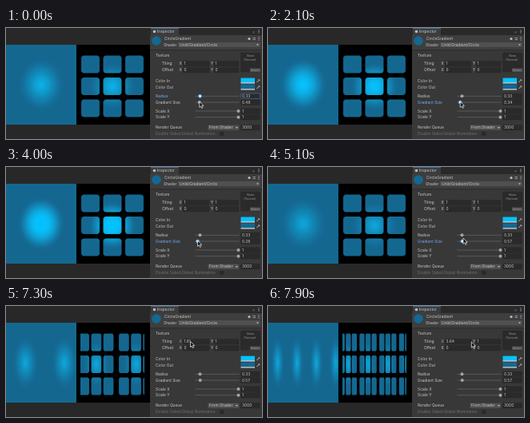
Write an HTML page with a canvas that moves like this. It is 320 px wide and 139 px high and loops after 8000 ms.

```html
<!DOCTYPE html>
<html lang="en">
<head>
<meta charset="utf-8">
<title>Circle gradient inspector</title>
<style>
html, body { margin: 0; width: 100%; height: 100%; overflow: hidden; background: #282828; }
#stage { position: relative; width: 320px; height: 139px; overflow: hidden; }
canvas, svg { position: absolute; left: 0; top: 0; }
text { font: 4.9px Inter, "Liberation Sans", sans-serif; fill: #c8c8c8; }
.small { font-size: 3.6px; fill: #999; }
.dim { fill: #707070; }
.on { fill: #6fb0f5; }
.field { fill: #2a2a2a; stroke: #242424; stroke-width: .4; }
.field.on { fill: #2a2a2a; stroke: #3a79bb; stroke-width: .6; }
.menu { fill: #505050; stroke: #303030; stroke-width: .4; }
.knob { fill: #a5a5a5; }
.knob.on { fill: #e4f2ff; stroke: #3e8fd0; stroke-width: .9; }
</style>
</head>
<body>
<div id="stage">
  <canvas id="view" width="181" height="139"></canvas>
  <svg id="panel" width="320" height="139" viewBox="0 0 320 139"></svg>
</div>
<script>
const LOOP = 8000, STEP = 100;
const IN = [4, 194, 253], OUT = [20, 104, 146];
const RADIUS = 0.33;
const cyan = `rgb(${IN})`, blue = `rgb(${OUT})`;

// [time, value] points, joined by straight lines
const sizeKeys = [[0, .48], [900, .06], [1000, .03], [1100, 0], [1200, 0], [1400, .09], [1500, .09],
  [1800, .26], [2000, .26], [2300, .5], [2400, .5], [3300, 1.04], [4000, .28], [4100, .28], [4800, .57]];
const tileKeys = [[6400, 1], [7000, 1.5], [7300, 1.81], [7900, 3.64]];
const pathX = [[5000, 243], [5300, 246], [5400, 246], [5800, 226], [6100, 226], [6400, 220]];
const pathY = [[0, 92.3], [5000, 92.3], [5300, 83], [5400, 83], [5800, 52], [6100, 52], [6400, 43], [7300, 44.5], [7900, 45]];

function track(keys, t) {
  if (t <= keys[0][0]) return keys[0][1];
  for (let i = 1; i < keys.length; i++) {
    const [a, p] = keys[i - 1], [b, q] = keys[i];
    if (t <= b) return p + (q - p) * (t - a) / (b - a);
  }
  return keys[keys.length - 1][1];
}
const clamp = v => Math.min(1, Math.max(0, v));
const knobX = size => 236.5 + size * 11;
const num = v => String(+v.toFixed(2));

// Inspector panel
const text = (x, y, s, cls = '', id = '') => `<text x="${x}" y="${y + 1.75}" class="${cls}" id="${id}">${s}</text>`;
const box = (x, y, w, h, cls, id = '') => `<rect x="${x}" y="${y}" width="${w}" height="${h}" rx="1" class="${cls}" id="${id}"/>`;
const fill = (x, y, w, h, c) => `<rect x="${x}" y="${y}" width="${w}" height="${h}" fill="${c}"/>`;
const arrow = (x, y) => `<path d="M${x} ${y}h3l-1.5 2z" fill="#bbb"/>`;
const dots = (x, y) => [0, 1.7, 3.4].map(d => `<circle cx="${x}" cy="${y + d}" r=".55" fill="#bbb"/>`).join('');

function slider(y, label, value, x, id) {
  return text(187, y, label, '', id + 'Label') + fill(236.5, y - .4, 55, .8, '#606060') +
    `<circle cx="${x}" cy="${y}" r="2" class="knob" id="${id}Knob"/>` +
    box(293.5, y - 3.3, 24, 6.6, 'field', id + 'Field') + text(295, y, value, '', id + 'Value');
}
function vector(y, label, v, id) {
  return text(195, y, label) +
    text(216.5, y, 'X', '', id + 'X') + box(221, y - 3.3, 33, 6.6, 'field') + text(222.5, y, v, '', id + 'Value') +
    text(256, y, 'Y') + box(260, y - 3.3, 31, 6.6, 'field') + text(261.5, y, v);
}
function swatch(y, label, color) {
  return text(187, y, label) + fill(293.5, y - 3.4, 17.5, 5.8, color) + fill(293.5, y + 2.4, 17.5, 1, '#fff') +
    `<path d="M313.5 ${y + 2}l3-3M315.5 ${y - 2}l2 2" stroke="#bbb" stroke-width="1" fill="none"/>`;
}

document.getElementById('panel').innerHTML =
  fill(180, 0, 140, 139, '#383838') + fill(180, 0, 140, 9, '#292929') + fill(181, 0, 35, 9, '#3c3c3c') +
  fill(181, 0, 35, .8, '#3a79bb') + fill(180, 9, 140, 18.5, '#3e3e3e') + fill(180, 27.5, 140, .6, '#222') +
  '<circle cx="185.5" cy="4.5" r="1.8" fill="#bbb"/>' + text(189, 4.5, 'Inspector') +
  dots(316, 2.7) + box(308, 4, 3, 2.5, 'menu') +
  `<circle cx="188" cy="16" r="5.8" fill="${blue}"/>` +
  text(198, 13.7, 'CircleGradient') +
  '<circle cx="304" cy="13.5" r="1.6" fill="#bbb"/>' +
  '<path d="M308.5 12.5h3.5M308.5 14.5h3.5" stroke="#bbb" stroke-width=".7"/>' + dots(316, 11.9) +
  text(197, 21, 'Shader') + box(214.5, 17.5, 103.5, 7, 'menu') + text(217, 21, 'Unlit/Gradient/Circle') + arrow(313, 20.2) +
  text(187, 34.5, 'Texture') + box(293.5, 31, 24.5, 24, 'field') +
  text(301, 34.5, 'None', 'small') + text(297, 39, '(Texture)', 'small') +
  fill(305, 50.5, 13, 4.5, '#505050') + text(306, 52.3, 'Select', 'small') +
  vector(44.7, 'Tiling', 1, 'tile') + vector(52.7, 'Offset', 0, 'offset') +
  swatch(66, 'Color In', cyan) + swatch(74, 'Color Out', blue) +
  slider(85.3, 'Radius', num(RADIUS), 242.5, 'radius') + slider(93, 'Gradient Size', '', 0, 'size') +
  slider(104, 'Scale X', 1, 290.5, 'sx') + slider(111.7, 'Scale Y', 1, 290.5, 'sy') +
  text(187, 124.7, 'Render Queue') + box(252, 121.2, 39.5, 7, 'menu') + text(254, 124.7, 'From Shader') + arrow(287, 123.9) +
  box(293.5, 121.4, 24, 6.6, 'field') + text(295, 124.7, '3000') +
  text(187, 132.7, 'Double Sided Global Illumination', 'dim') + box(267.5, 130.3, 4.5, 4.5, 'field') +
  '<path id="mouse" d="M0 0v7l1.7-1.5 1.2 2.6 1.3-.6-1.2-2.5h2.2z" fill="#111" stroke="#f4f4f4" stroke-width=".7"/>';

const el = id => document.getElementById(id);
const mark = (on, ...ids) => ids.forEach(id => el(id).classList.toggle('on', on));

// Shaded quads
const ctx = el('view').getContext('2d');
const left = { x: 0, y: 21, w: 88, h: 100, mask: () => 1 };
const right = { x: 88, y: 28, w: 90, h: 90, mask: grid };
const GAP = 27.5, HALF_X = 11.5, HALF_Y = 11, CORNER = 3.6;

// Colours blend in linear light
const toLinear = c => (c / 255) ** 2.2;
const ramp = Array.from({ length: 256 }, (_, i) => IN.map((c, k) => {
  const a = toLinear(OUT[k]), b = toLinear(c);
  return 255 * (a + (b - a) * i / 255) ** (1 / 2.2);
}));

// Coverage of a 3 by 3 grid of rounded squares
function grid(u, v) {
  const cell = p => Math.abs(p - GAP * Math.max(-1, Math.min(1, Math.round(p / GAP))));
  const x = cell((u - .5) * right.w) - HALF_X + CORNER;
  const y = cell((v - .5) * right.h) - HALF_Y + CORNER;
  const dist = Math.hypot(Math.max(x, 0), Math.max(y, 0)) + Math.min(Math.max(x, y), 0) - CORNER;
  return clamp(.5 - dist);
}

function shade(q, size, tile) {
  const img = ctx.createImageData(q.w, q.h), soft = Math.max(size, .012), n = 4;
  for (let y = 0, k = 0; y < q.h; y++) {
    const v = (y + .5) / q.h;
    for (let x = 0; x < q.w; x++, k += 4) {
      for (let s = 0; s < n; s++) {
        const u = (x + (s + .5) / n) / q.w * tile % 1;
        const f = clamp((RADIUS - Math.hypot(u - .5, v - .5)) / soft);
        const rgb = ramp[Math.round(255 * f * f * (3 - 2 * f))];
        const cover = q.mask(u, v) / n;
        for (let c = 0; c < 3; c++) img.data[k + c] += rgb[c] * cover;
      }
      img.data[k + 3] = 255;
    }
  }
  ctx.putImageData(img, q.x, q.y);
}

function draw(t) {
  const size = track(sizeKeys, t), tile = track(tileKeys, t);
  ctx.fillStyle = '#282828';
  ctx.fillRect(0, 0, 181, 139);
  shade(left, size, tile);
  shade(right, size, tile);

  // The mesh ends at the outer edges of the untiled grid
  const mid = right.x + right.w / 2, reach = Math.round(GAP + HALF_X) + 1;
  ctx.fillStyle = '#000';
  ctx.fillRect(88, 21, 93, 7);
  ctx.fillRect(88, 118, 93, 3);
  ctx.fillRect(88, 21, mid - reach - 88, 100);
  ctx.fillRect(mid + reach, 21, 181 - mid - reach, 100);

  el('sizeKnob').setAttribute('cx', knobX(size));
  el('sizeValue').textContent = num(size);
  el('tileValue').textContent = num(tile);
  mark(t < 100, 'radiusLabel', 'radiusKnob', 'radiusField');
  mark(t >= 100 && t < 6500, 'sizeLabel', 'sizeKnob');
  mark(t >= 6500, 'tileX');

  const mx = t < 5000 ? knobX(size) : track(pathX, t) + (tile - 1) * 13;
  el('mouse').setAttribute('transform', `translate(${mx} ${track(pathY, t)})`);
}

const start = performance.now();
let last = -1;
function tick() {
  const t = Math.floor((performance.now() - start) % LOOP / STEP) * STEP;
  if (t !== last) draw(last = t);
  requestAnimationFrame(tick);
}
tick();
</script>
</body>
</html>
```
